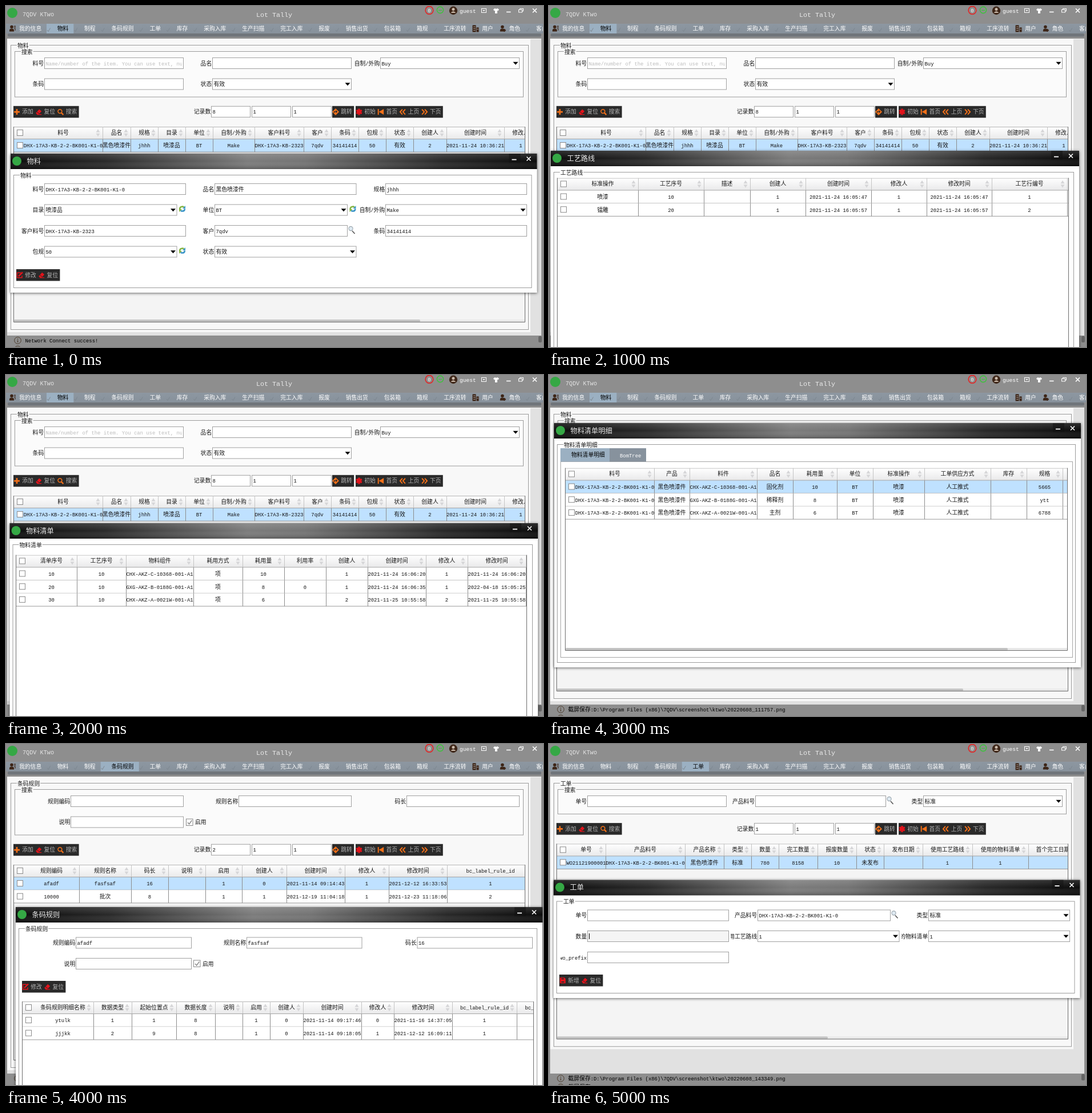
Animation of 940x596 px, one loop 6000 ms. Source, as an HTML page:

```html
<!DOCTYPE html>
<html lang="zh">
<head>
<meta charset="utf-8">
<title>Lot Tally</title>
<style>
html, body { margin: 0; width: 100%; height: 100%; overflow: hidden; background: #8e8e8e; }
svg { display: block; }
text { font-family: "Liberation Mono", "Noto Sans CJK SC", "Noto Sans CJK", monospace; white-space: pre; }
.cjk { font-family: "Noto Sans CJK SC", "Noto Sans CJK", sans-serif; }
.modal { filter: drop-shadow(0 1px 2.5px rgba(0, 0, 0, .6)); }
</style>
</head>
<body>
<svg id="stage" width="940" height="596" viewBox="0 0 940 596">
  <defs>
    <linearGradient id="head" x2="0" y2="1"><stop stop-color="#fff"/><stop offset="1" stop-color="#e9e9ea"/></linearGradient>
    <linearGradient id="bar"><stop stop-color="#0c0c0c"/><stop offset=".18" stop-color="#2a2a2a"/><stop offset=".45" stop-color="#7c7c7c"/><stop offset=".56" stop-color="#747474"/><stop offset=".82" stop-color="#282828"/><stop offset="1" stop-color="#0c0c0c"/></linearGradient>
    <linearGradient id="shade" x2="0" y2="1"><stop stop-color="#fff" stop-opacity=".14"/><stop offset=".5" stop-color="#fff" stop-opacity="0"/><stop offset="1" stop-color="#000" stop-opacity=".25"/></linearGradient>
    <linearGradient id="tabs" x2="0" y2="1"><stop stop-color="#8d97a1"/><stop offset="1" stop-color="#87919b"/></linearGradient>
  </defs>
  <g id="view"></g>
</svg>
<script>
const LATIN = 8.9, CJK = 9.8, INK = '#151515', ORANGE = '#f27019', RED = '#e3131b', LOGO = '#35a845';

const rect = (x, y, w, h, fill, stroke = 'none', more = '') =>
  `<rect x="${x}" y="${y}" width="${w}" height="${h}" fill="${fill}" stroke="${stroke}" ${more}/>`;
const path = (d, stroke, width = 1, fill = 'none') =>
  `<path d="${d}" stroke="${stroke}" stroke-width="${width}" fill="${fill}"/>`;
const dot = (x, y, r, fill, stroke = 'none', width = 1) =>
  `<circle cx="${x}" cy="${y}" r="${r}" fill="${fill}" stroke="${stroke}" stroke-width="${width}"/>`;
const at = (x, y, body) => `<g transform="translate(${x} ${y})">${body}</g>`;
const clip = (x, y, w, h, body) =>
  `<svg x="${x}" y="${y}" width="${w}" height="${h}" viewBox="${x} ${y} ${w} ${h}">${body}</svg>`;

// Chinese and Latin runs have their own sizes
function text(x, y, s, fill = INK, anchor = 'start', latin = LATIN, cjk = CJK) {
  const runs = s.replace(/[\u2e80-\uffff]+|[^\u2e80-\uffff]+/g, run =>
    run > '\u2e80' ? `<tspan class="cjk" font-size="${cjk}">${run}</tspan>`
                   : `<tspan font-size="${latin}">${run}</tspan>`);
  return `<text x="${x}" y="${y + cjk * .36}" fill="${fill}" text-anchor="${anchor}">${runs}</text>`;
}

const person = path('M-4 5V3Q-4 0 0 0Q4 0 4 3V5Z', 'none', 0, '#3d2517') + dot(0, -3, 2.8, '#3d2517');
const lens = c => path('M1.5 1.5L5 5', c, 2.2) + dot(-1, -1, 3.4, 'none', c, 1.6);
const chevrons = path('M-4.5 -4.5L-.5 0L-4.5 4.5M.5 -4.5L4.5 0L.5 4.5', ORANGE, 2);
const icons = {
  plus: path('M-5 0H5M0 -5V5', ORANGE, 2.6),
  erase: path('M-5 2L1 -4.5L5 -1L0 4.5H-3Z', 'none', 0, RED) + path('M-3 0L1.5 3.5', '#2a2a2a', 1) + path('M-3 4.5H5', RED, 1.2),
  find: lens(ORANGE),
  jump: path('M0 -6L6 0L0 6L-6 0Z', 'none', 0, ORANGE) + path('M-2.5 2V-.5H1.5M.5 -2.5L2.5 -.5L.5 1.5', '#2a2a2a', 1.1),
  init: path('M0 -5.5V5.5M-4.8 -2.8L4.8 2.8M-4.8 2.8L4.8 -2.8', RED, 3.4),
  first: path('M-4.5 -5V5', ORANGE, 2) + path('M5 -5V5L-3.5 0Z', 'none', 0, ORANGE),
  prev: `<g transform="scale(-1 1)">${chevrons}</g>`,
  next: chevrons,
  edit: path('M2 -4H-4.5V4.5H4V1', RED, 1.5) + path('M-2 2L5 -5', RED, 2.4),
  save: path('M-5 -5H3L5 -3V5H-5Z', 'none', 0, RED) + path('M-2.5 -3H2M-2.5 2.5H2.5', '#2a2a2a', 1.8),
  sync: path('M-4.5 1Q-4.5 -4 1 -4L3 -3', '#86b545', 2.6) + path('M5.5 -5.5V-.5H.5Z', 'none', 0, '#3f9bc4') +
        path('M4.5 0Q4 4.5 -1 4L-3 3', '#3c95c8', 2.6) + path('M-5.5 5.5V.5H-.5Z', 'none', 0, '#86b545'),
  glass: path('M1 2L5.5 7', '#555', 1.6) + dot(-1.5, -2, 3.6, '#dfeaf2', '#9aa5ad', 1.1),
  boss: person + path('M1 3H6M3.5 .5V5.5', '#3d2517', 2),
  card: person + path('M4 -4H7M4 -1H7M5 2H7', '#3d2517', 1.3),
  block: rect(-5, -6, 6, 12, '#3d2517') + rect(2, -2, 4, 8, '#3d2517') + path('M-3.5 -3H0M-3.5 0H0M-3.5 3H0M3 1H5', '#a9a29c', 1),
};
const icon = (name, x, y) => at(x, y, icons[name]);

function buttons(x, y, list) {
  const step = 38.2;
  return rect(x, y, step * list.length, 20.5, '#2a2a2a') + list.map(([name, label], i) =>
    icon(name, x + i * step + 6, y + 10.3) + text(x + i * step + 15.3, y + 10, label, '#b4b4b4')).join('');
}

function check(x, y, size = 10, on = false) {
  return rect(x, y, size, size, '#fff', '#8a8a8a') +
    (on ? path(`M${x + 2.5} ${y + 6}l2.7 3l4.5 -6.5`, '#8a8a8a', 1.4) : '');
}

// kind: sel, sync (select with refresh), glass (lookup), hint, focus
function field(label, x, r, y, value = '', kind = '') {
  const w = r - x, list = kind === 'sel' || kind === 'sync';
  return clip(x - 47, y - 8, 46.6, 16, text(x - .8, y, label, INK, 'end')) +
    rect(x + .5, y - 9.5, w - 1, 19, kind === 'focus' ? '#f5f5f5' : '#fff', '#a0a0a0') +
    clip(x, y - 9, w - 3, 18, text(x + 2.5, y, value, kind === 'hint' ? '#bdbdbd' : INK)) +
    (list ? path(`M${r - 11.5} ${y - 2.3}h9l-4.5 5z`, 'none', 0, '#000') : '') +
    (kind === 'focus' ? path(`M${x + 3.5} ${y - 5}v10`, '#000') : '') +
    (kind === 'sync' ? icon('sync', r + 9, y - 2) : '') +
    (kind === 'glass' ? icon('glass', r + 7, y - 2) : '');
}

function group(x, y, r, b, legend, fill) {
  const w = [...legend].length * CJK;
  return rect(x + .5, y + .5, r - x, b - y, fill, '#9b9b9b') +
    rect(x + 11, y - 2, w + 2, 5, fill) + text(x + 12, y + 1, legend);
}

function table({ x, y, r, b, cols, heads, rows, sel = -1, thumb, fill = '#fff' }) {
  const H = 21.5, R = 22.7, edges = [x, ...cols];
  const cell = (s, i, cy, c) => {
    const left = edges[i], right = edges[i + 1];
    const mid = (left + (i ? 0 : 18) + right) / 2;
    return clip(left, cy - 9, right - left, 18, text(mid, cy, s, c, 'middle'));
  };
  let out = rect(x, y, r - x, H, 'url(#head)') + path(`M${x} ${y + .5}H${r}`, '#b5b5b5');
  heads.split('|').forEach((s, i) => {
    const e = edges[i + 1], cy = y + 10.8;
    if (s) out += path(`M${e - 11.5} ${cy - 1}h7l-3.5 -5.5zM${e - 11.5} ${cy + 1}h7l-3.5 5.5z`, 'none', 0, '#d6d6d8');
    out += path(`M${e + .5} ${y}v${H}`, '#c4c4c4') + cell(s, i, cy - .5);
  });
  out += check(x + 6.5, y + 5.5);
  rows.forEach((row, j) => {
    const top = y + H + j * R;
    out += rect(x, top, r - x, R, j === sel ? '#bfe1ff' : '#fff') +
      path(`M${x} ${top + R}H${r}`, '#999') + check(x + 6.5, top + 6);
    row.split('|').forEach((s, i) => {
      out += path(`M${edges[i + 1] + .5} ${top}v${R}`, '#8c8c8c') + cell(s, i, top + 11.3);
    });
  });
  out += path(`M${x} ${y + H}H${r}`, '#a5a5a5');
  if (thumb) out += rect(x + 1, b - 5, r - x - 2, 4.5, '#e9e9e9') + rect(x + 1, b - 5, thumb - x, 4.5, '#c3c3c3', 'none', 'rx="2"');
  return rect(x, y, r - x, b - y, fill) + clip(x, y, r - x, b - y, out) +
    path(`M${x + .5} ${y}V${b - .5}H${r - .5}V${y}`, '#6c6c6c');
}

function modal(x, y, r, b, title, body) {
  const w = r - x;
  return `<g class="modal">${rect(x, y, w, b - y, '#fff')}</g>` +
    rect(x, y, w, 27, 'url(#bar)') + rect(x, y, w, 27, 'url(#shade)') +
    dot(x + 11, y + 13, 8, LOGO) + text(x + 28.5, y + 13.5, title, '#ececec', 'start', 11, 12.2) +
    rect(r - 49, y, 20, 16, '#111', 'none', 'opacity=".5"') +
    path(`M${r - 44} ${y + 10.5}h8`, '#fff', 1.8) +
    path(`M${r - 18} ${y + 5.5}l7 7m0 -7l-7 7`, '#fff', 1.6) +
    group(x + 5, y + 37, r - 10, b - 9, title, '#fff') + body;
}

const tabNames = ['物料', '制程', '条码规则', '工单', '库存', '采购入库', '生产扫描', '完工入库', '报废',
  '销售出货', '包装箱', '箱规', '工序流转', '用户', '角色', '客户'];
const tabIcons = { 用户: 'block', 角色: 'boss' };

function chrome(active) {
  let out = rect(0, 0, 940, 596, '#8e8e8e') + dot(11, 12, 9, LOGO) +
    text(29, 14.5, '7QDV KTwo', '#e4e4e4', 'start', 10.2) + text(438, 15, 'Lot Tally', '#e8e8e8', 'start', 11.7) +
    dot(741, 7.5, 6.8, 'none', '#e02a2a', 1.8) + text(741, 7.5, '0', '#fff', 'middle') +
    dot(760, 7, 5.6, 'none', '#3fc23f', 1.6) + path('M757 7.5h6', '#3fc23f', 1.2) +
    dot(783, 8, 7.2, '#3d2517') + dot(783, 5.7, 2.5, '#c9b8a8') + path('M778.5 12Q783 6.5 787.5 12Z', 'none', 0, '#c9b8a8') +
    text(794, 8.5, 'guest', '#fff', 'start', 9.6) +
    rect(832.5, 4.5, 8, 7, 'none', '#fff') + path('M834.5 7h4l-2 2.5z', 'none', 0, '#fff') +
    path('M853 6l3 -2q2 2 4 0l3 2l-1.5 2.5l-1.5 -.5v5h-4v-5l-1.5 .5z', 'none', 0, '#fff') +
    path('M876 10.5h7.5', '#fff', 1.6) + rect(897.5, 6.5, 6, 4.5, 'none', '#fff') + path('M899.5 6V4.5H905.5V9H904', '#fff') +
    path('M922 4.5l7 7m0 -7l-7 7', '#fff', 1.6) +
    rect(0, 31, 940, 17, 'url(#tabs)') + rect(3, 48, 934, 5.5, '#70757a', 'none', 'rx="2"') +
    icon('card', 10, 39.5) + text(23, 39, '我的信息', '#fff');
  let x = 71;
  for (const name of tabNames) {
    const w = 27.65 + 9.85 * name.length, on = name === active;
    if (on) out += rect(x, 31, w, 17, '#9bb0c2');
    out += path(`M${x + 1} 42l2 2.5l3.5 -6`, '#7d8790', 1);
    if (tabIcons[name]) out += icon(tabIcons[name], x + 7, 39.5);
    out += text(x + 18.7, 39, name, on ? '#000' : '#fff');
    x += w;
  }
  return out + rect(2, 57, 935, 519, '#e1e1e1') + path('M2 57.5H937', '#f5f5f5');
}

function status(line, next = '') {
  const info = y => dot(20.5, y, 5.8, 'none', '#4a3a2a', 1) + path(`M20.5 ${y - 3}v1.5m0 1.2v3.5`, '#4a3a2a', 1.4);
  return rect(0, 576, 940, 20, '#8e8e8e') + info(584.5) + info(600) +
    text(33.5, 584.5, line, '#000') + text(33.5, 599, next, '#000') + rect(932, 577, 6, 11, '#666', 'none', 'rx="2"');
}

function page(name, { shift = 0, count, fields, grid }) {
  const y = 174.8 - shift, bottom = 565 - shift;
  return chrome(name) + rect(2, 58, 916, bottom - 53, '#f8f8f8') +
    group(8, 68, 914, bottom, name, '#f8f8f8') + group(15, 79, 905, 158.5 - shift, '搜索', '#fbfbfb') + fields +
    buttons(13, y, [['plus', '添加'], ['erase', '复位'], ['find', '搜索']]) +
    field('记录数', 359, 428, y + 10, count) + field('', 430, 499, y + 10, '1') + field('', 501, 570, y + 10, '1') +
    buttons(571, y, [['jump', '跳转']]) +
    buttons(612, y, [['init', '初始'], ['first', '首页'], ['prev', '上页'], ['next', '下页']]) +
    table({ x: 13, y: 211 - shift, r: 909, b: 553 - shift, sel: 0, fill: '#f4f4f4', ...grid });
}

const part = 'DHX-17A3-KB-2-2-BK001-K1-0', paint = '黑色喷漆件', client = '7qdv';
const reset = ['erase', '复位'];
const shot = id => `截屏保存:D:\\Program Files (x86)\\7QDV\\screenshot\\ktwo\\${id}.png`;

const itemPage = page('物料', {
  count: '8',
  fields: field('料号', 67, 311, 100, 'Name/number of the item. You can use text, numbers', 'hint') +
    field('品名', 361, 605, 100) + field('自制/外购', 655, 899, 100, 'Buy', 'sel') +
    field('条码', 67, 311, 136.5) + field('状态', 361, 605, 136.5, '有效', 'sel'),
  grid: {
    cols: [169, 218, 266, 314, 362, 435, 521, 569, 617, 665, 713, 771, 872, 930], thumb: 724,
    heads: '料号|品名|规格|目录|单位|自制/外购|客户料号|客户|条码|包规|状态|创建人|创建时间|修改人',
    rows: [`${part}|${paint}|jhhh|喷漆品|BT|Make|DHX-17A3-KB-2323|${client}|34141414|50|有效|2|2021-11-24 10:36:21|1`],
  },
});

const itemEdit = () => itemPage + status('Network Connect success!') + modal(8, 258, 929.5, 501, '物料',
  field('料号', 67, 315, 320, part) + field('品名', 365, 613.5, 320, paint) + field('规格', 664, 912, 320, 'jhhh') +
  field('目录', 67, 299.5, 356.5, '喷漆品', 'sync') + field('单位', 365, 598, 356.5, 'BT', 'sync') +
  field('自制/外购', 664, 912, 356.5, 'Make', 'sel') +
  field('客户料号', 67, 315, 393, 'DHX-17A3-KB-2323') + field('客户', 365, 598, 393, client, 'glass') +
  field('条码', 664, 912, 393, '34141414') +
  field('包规', 67, 299.5, 429.5, '50', 'sync') + field('状态', 365, 613.5, 429.5, '有效', 'sel') +
  buttons(18, 460, [['edit', '修改'], reset]));

const route = () => itemPage + status('') + modal(3, 253, 928, 640, '工艺路线', table({
  x: 14, y: 300.5, r: 910, b: 625, cols: [156, 271, 352, 449, 564, 661, 775, 907],
  heads: '标准操作|工艺序号|描述|创建人|创建时间|修改人|修改时间|工艺行编号',
  rows: ['喷漆|10||1|2021-11-24 16:05:47|1|2021-11-24 16:05:47|1',
    '镭雕|20||1|2021-11-24 16:05:57|1|2021-11-24 16:05:57|2'],
}));

const bom = () => itemPage + status('') + modal(6.5, 259, 931, 640, '物料清单', table({
  x: 17, y: 314.5, r: 912, b: 625, cols: [124, 210, 328, 414, 487, 560, 633, 735, 808, 910],
  heads: '清单序号|工艺序号|物料组件|耗用方式|耗用量|利用率|创建人|创建时间|修改人|修改时间',
  rows: ['10|10|CHX-AKZ-C-10368-001-A1|项|10||1|2021-11-24 16:06:20|1|2021-11-24 16:06:20',
    '20|10|GXG-AKZ-B-0188G-001-A1|项|8|0|1|2021-11-24 16:06:35|1|2022-04-18 15:05:25',
    '30|10|CHX-AKZ-A-0021W-001-A1|项|6||2|2021-11-25 10:55:58|2|2021-11-25 10:55:58'],
}));

const bomDetail = () => itemPage + status(shot('20220608_111757')) + modal(9, 84, 931, 511, '物料清单明细',
  rect(20.5, 151.5, 896, 342, '#fff', '#a5a5a5') +
  rect(20, 128, 86, 23.5, '#9bb0c2') + rect(106, 128, 64, 23.5, '#87929d') +
  text(39, 139.5, '物料清单明细', '#000') + text(124, 140, 'BomTree', '#fff') +
  table({
    x: 28, y: 162.5, r: 908, b: 482, sel: 0, thumb: 802, cols: [184, 246, 364, 427, 504, 567, 657, 773, 836, 899, 960],
    heads: '料号|产品|料件|品名|耗用量|单位|标准操作|工单供应方式|库存|规格|',
    rows: ['CHX-AKZ-C-10368-001-A1|固化剂|10|5665', 'GXG-AKZ-B-0188G-001-A1|稀释剂|8|ytt', 'CHX-AKZ-A-0021W-001-A1|主剂|6|6788']
      .map(s => s.split('|')).map(([id, name, qty, spec]) => `${part}|${paint}|${id}|${name}|${qty}|BT|喷漆|人工推式||${spec}|`),
  }));

const rules = () => page('条码规则', {
  count: '2',
  fields: field('规则编码', 113, 311, 100) + field('规则名称', 407, 605, 100) + field('码长', 701, 899, 100) +
    field('说明', 113, 311, 136.5) + check(315.5, 131, 11.5, true) + text(331, 136.5, '启用'),
  grid: {
    cols: [128, 219, 284, 349, 413, 491, 593, 670, 772, 924],
    heads: '规则编码|规则名称|码长|说明|启用|创建人|创建时间|修改人|修改时间|bc_label_rule_id',
    rows: ['afadf|fasfsaf|16||1|0|2021-11-14 09:14:43|1|2021-12-12 16:33:53|1',
      '10000|批次|8||1|1|2021-12-19 11:04:18|1|2021-12-23 11:18:06|2'],
  },
}) + status('') + modal(17, 285, 939, 640, '条码规则',
  field('规则编码', 122, 325, 347.5, 'afadf') + field('规则名称', 421, 623.5, 347.5, 'fasfsaf') +
  field('码长', 719.5, 922, 347.5, '16') + field('说明', 122, 325, 384) +
  check(328.5, 378, 11.5, true) + text(344, 384, '启用') + buttons(28, 414, [['edit', '修改'], reset]) +
  table({
    x: 28, y: 450, r: 924, b: 625, cols: [153, 220, 298, 366, 414, 462, 520, 622, 679, 781, 894, 1008],
    heads: '条码规则明细名称|数据类型|起始位置点|数据长度|说明|启用|创建人|创建时间|修改人|修改时间|bc_label_rule_id|bc_label_rule_id',
    rows: ['ytulk|1|1|8||1|0|2021-11-14 09:17:46|0|2021-11-16 14:37:05|1|',
      'jjjkk|2|9|8||1|0|2021-11-14 09:18:05|1|2021-12-12 16:09:11|1|'],
  }));

const order = () => page('工单', {
  shift: 36.7, count: '1',
  fields: field('单号', 67, 311, 100) + field('产品料号', 361, 590, 100, '', 'glass') + field('类型', 655, 899, 100, '标准', 'sel'),
  grid: {
    cols: [99, 238, 306, 354, 402, 470, 538, 586, 654, 741, 839, 925], thumb: 487,
    heads: '单号|产品料号|产品名称|类型|数量|完工数量|报废数量|状态|发布日期|使用工艺路线|使用的物料清单|首个完工日期',
    rows: [`WO21121900001|${part}|${paint}|标准|780|8158|10|未发布||1|1|`],
  },
}) + status(shot('20220608_143349'), shot('20220608_143326')) + modal(8, 237.5, 929.5, 444, '工单',
  field('单号', 67, 315, 299.5) + field('产品料号', 365, 598, 299.5, part, 'glass') + field('类型', 664, 912, 299.5, '标准', 'sel') +
  field('数量', 67, 315, 336, '', 'focus') + field('使用工艺路线', 365, 613.5, 336, '1', 'sel') +
  field('使用的物料清单', 664, 912, 336, '1', 'sel') + field('wo_prefix', 67, 315, 373) +
  buttons(18, 403, [['save', '新增'], reset]));

const scenes = [itemEdit, route, bom, bomDetail, rules, order];
const HOLD = 1000;
const view = document.getElementById('view');
let shown = -1;

function render(time) {
  const i = Math.floor(time / HOLD) % scenes.length;
  if (i === shown) return;
  shown = i;
  view.innerHTML = scenes[i]();
}

function tick() {
  render(performance.now());
  requestAnimationFrame(tick);
}
tick();
</script>
</body>
</html>
```
